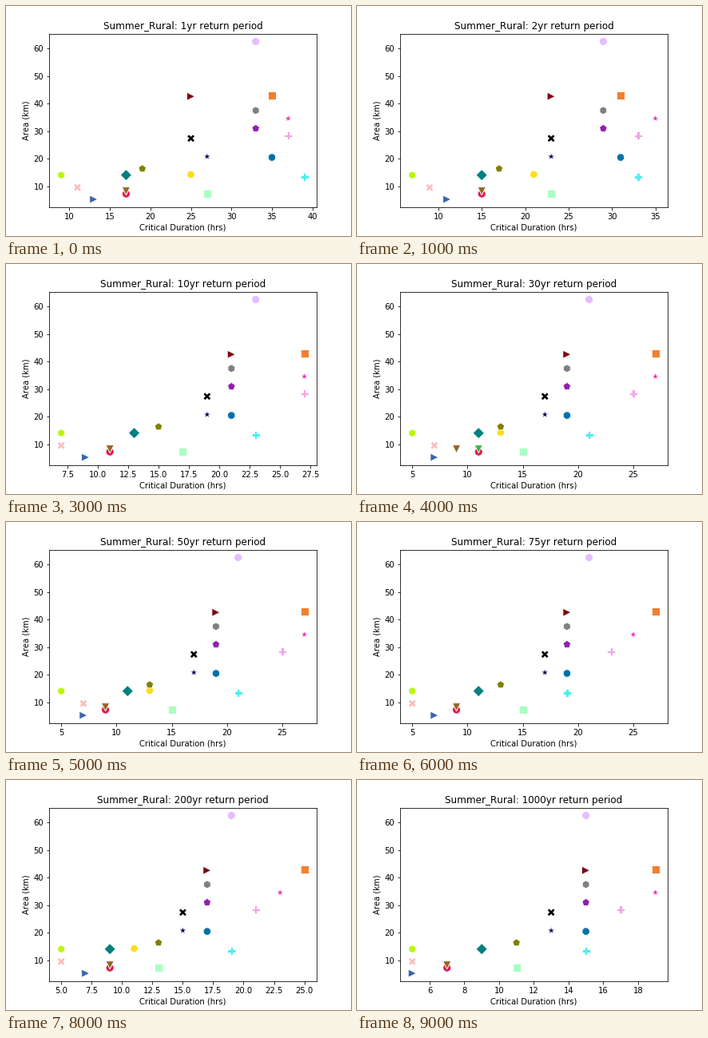
Write a matplotlib script that moves like this. It is 432 px wide and 288 px high and loops after 10000 ms.

```python
from itertools import cycle
from math import floor, log

import matplotlib.pyplot as plt
from matplotlib.animation import FuncAnimation
from matplotlib.markers import MarkerStyle

plt.rcParams["font.family"] = "DejaVu Sans"
plt.rcParams["text.kerning_factor"] = 6

PERIODS = [1, 2, 5, 10, 30, 50, 75, 100, 200, 1000]
KNEE, LONGEST = 30, 1000
MARKERS = "ov8>spP*hXD"

# colour, area (km), critical duration (hrs) at 1yr and at the knee
SITES = [
    ("#e6194b", 7.3, 17.9, 10.1),
    ("#3cb44b", 8.3, 17.9, 10.1),
    ("#ffdd1c", 14.3, 24.0, 12.2),
    ("#3a64b0", 5.3, 13.9, 7.6),
    ("#f08030", 42.9, 34.1, 27.0),
    ("#911eb4", 31.0, 33.9, 19.9),
    ("#46f0f0", 13.4, 39.9, 20.6),
    ("#f032b4", 34.6, 37.9, 26.4),
    ("#bcf60c", 14.1, 9.0, 5.9),
    ("#fabebe", 9.6, 10.8, 6.1),
    ("#008080", 14.1, 17.9, 11.2),
    ("#e6beff", 62.5, 33.9, 21.8),
    ("#9a6324", 8.3, 17.9, 9.9),
    ("#0072a8", 20.5, 35.5, 19.9),
    ("#800010", 42.6, 25.5, 19.5),
    ("#aaffc3", 7.3, 27.5, 15.4),
    ("#808000", 16.4, 19.9, 13.9),
    ("#f2a3ea", 28.4, 37.5, 24.4),
    ("#000058", 20.8, 26.0, 17.2),
    ("#808080", 37.5, 33.9, 19.9),
    ("#000000", 27.4, 24.3, 17.9),
]
colours, areas, starts, knees = zip(*SITES)


def duration(start, knee, period):
    """Falls fast up to the knee, then slowly; kept to odd hours."""
    if period <= KNEE:
        left = 1 - log(period) / log(KNEE)
        hours = knee + (start - knee) * left ** 1.8
    else:
        done = log(period / KNEE) / log(LONGEST / KNEE)
        hours = knee * (1 - 0.27 * done ** 1.5)
    return 2 * floor(hours / 2) + 1


def padded(values):
    low, high = min(values), max(values)
    pad = 0.05 * (high - low)
    return low - pad, high + pad


def marker_path(name):
    style = MarkerStyle(name)
    return style.get_path().transformed(style.get_transform())


fig, ax = plt.subplots(figsize=(6, 4), dpi=72, facecolor="white")
fig.subplots_adjust(left=0.125, right=0.9, bottom=0.125, top=0.88)
ax.set_xlabel("Critical Duration (hrs)")
ax.set_ylabel("Area (km)")
ax.set_ylim(*padded(areas))
title = ax.set_title("")

dots = ax.scatter(starts, areas, s=100, c=colours,
                  edgecolor="white", linewidth=0.8)
dots.set_paths([marker_path(m) for m, _ in zip(cycle(MARKERS), SITES)])


def draw(i):
    period = PERIODS[i]
    xs = [duration(a, b, period) for a, b in zip(starts, knees)]
    dots.set_offsets(list(zip(xs, areas)))
    ax.set_xlim(*padded(xs))
    title.set_text(f"Summer_Rural: {period}yr return period")
    return [title, dots]


anim = FuncAnimation(fig, draw, frames=len(PERIODS), interval=1000,
                     repeat=True, repeat_delay=0, blit=False)
plt.show()
```
